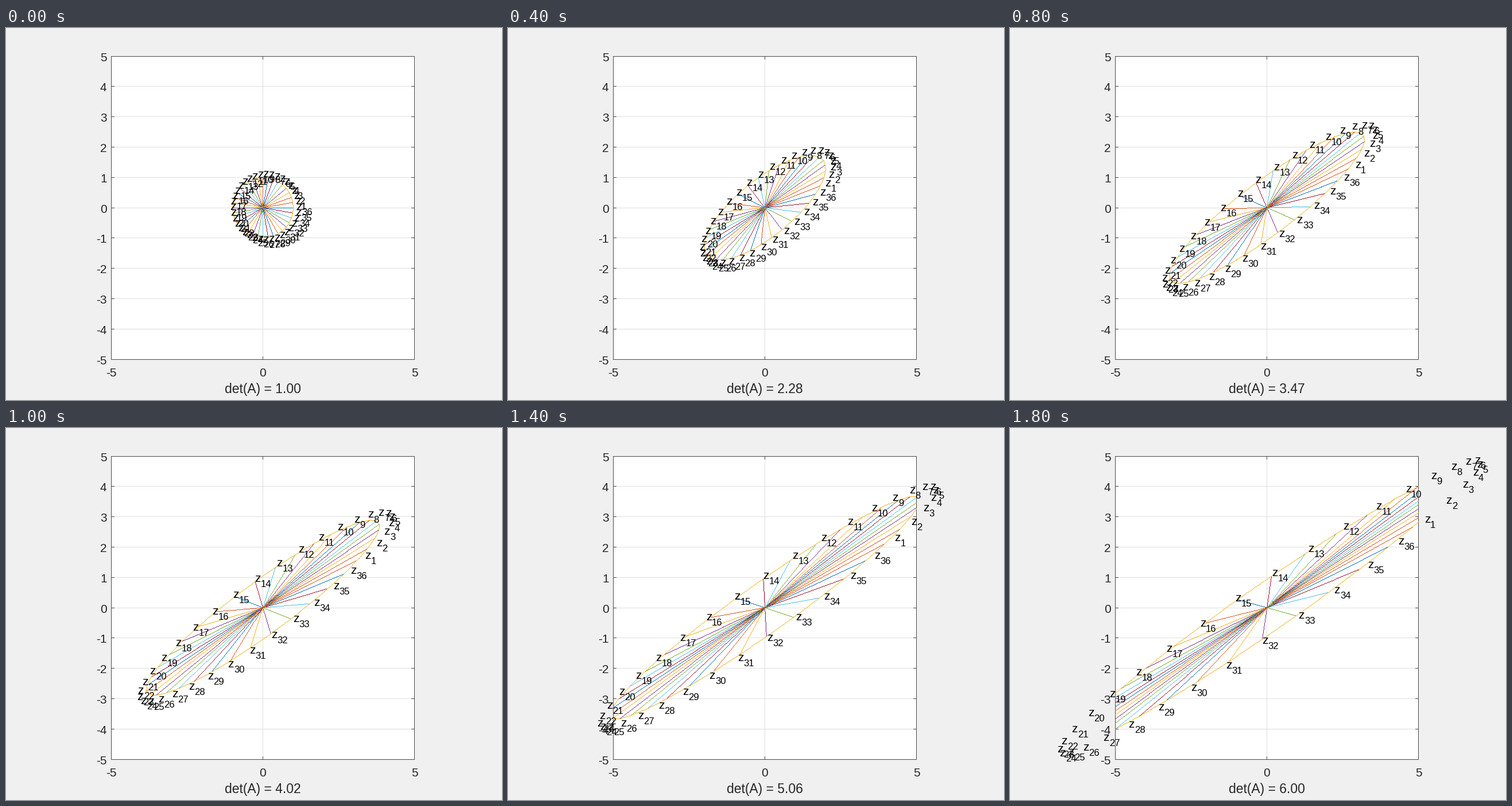
A matplotlib script for the animation above (2 s loop, 864 px wide and 648 px high).

```python
import numpy as np
import matplotlib.pyplot as plt
from matplotlib.animation import FuncAnimation
from matplotlib.colors import to_rgb
from matplotlib.patches import Rectangle

W, H, DPI = 864, 648, 150
CX, CY, UNIT = 447.6, 313.1, 52.81      # plot origin and unit length in pixels
PX = 72 / DPI                           # one pixel in points
STEPS = 10
COUNT = 36
INK, EDGE, GRID = "#262626", "#4a4a4a", "#dfdfdf"
COLORS = ["#0072bd", "#d95319", "#edb120", "#7e2f8e",
          "#77ac30", "#4dbeee", "#a2142f"]

plt.rcParams["font.family"] = "Liberation Sans"

fig = plt.figure(figsize=(W / DPI, H / DPI), dpi=DPI, facecolor="#f0f0f0")
ax = fig.add_axes([0, 0, 1, 1])
ax.axis("off")


def col(x):
    return np.floor(CX + x * UNIT) + 0.5


def row(y):
    return np.floor(CY - y * UNIT) + 0.5


def rule(x0, y0, x1, y1, color, z):
    ax.plot([x0, x1], [y0, y1], color=color, lw=PX, zorder=z,
            snap=False, solid_capstyle="projecting")


def write(x, y, s, size, color=INK, ha="left", z=3):
    return ax.text(x, y, s, fontsize=size, color=color, ha=ha,
                   va="baseline", zorder=z)


left, right, top, bottom = col(-5), col(5), row(5), row(-5)

ax.add_patch(Rectangle((left, top), right - left, bottom - top,
                       fc="white", ec="none", snap=False, zorder=0))

# Grid, ticks and tick labels
TICK = 5
for v in range(-5, 6):
    y = row(v)
    if abs(v) < 5:
        rule(left, y, right, y, GRID, 1)
    rule(left, y, left + TICK, y, EDGE, 2)
    rule(right - TICK, y, right, y, EDGE, 2)
    write(175.5, y + 8.5, str(v), 10, ha="right")
rule(col(0), top, col(0), bottom, GRID, 1)
for v in (-5, 0, 5):
    x = col(v)
    rule(x, bottom - TICK, x, bottom, EDGE, 2)
    rule(x, top, x, top + TICK, EDGE, 2)
    write(x, 607, str(v), 10, ha="center")
for y in (top, bottom):
    rule(left, y, right, y, EDGE, 2)
for x in (left, right):
    rule(x, top, x, bottom, EDGE, 2)

caption = write(CX, 636, "", 11, ha="center")
names = [(write(0, 0, "z", 10, "black", z=6),
          write(0, 0, str(k), 8, "black", z=6)) for k in range(1, COUNT + 1)]

# Thin aliased lines are rasterised onto a transparent layer.
layer = np.zeros((H, W, 4))
plot = ax.imshow(layer, extent=(0, W, H, 0), aspect="auto",
                 interpolation="nearest", zorder=4)
ax.set_xlim(0, W)
ax.set_ylim(H, 0)


def stroke(x0, y0, x1, y1, i):
    n = int(np.ceil(max(abs(x1 - x0), abs(y1 - y0)))) + 1
    x = np.floor(np.linspace(x0, x1, n)).astype(int)
    y = np.floor(np.linspace(y0, y1, n)).astype(int)
    inside = (x > left - 1) & (x < right) & (y > top - 1) & (y < bottom)
    layer[y[inside], x[inside]] = (*to_rgb(COLORS[i % len(COLORS)]), 1)


# The closing vector repeats the first one.
angles = np.radians(10 * np.arange(1, COUNT + 2))
circle = np.array([np.cos(angles), np.sin(angles)])
START = np.eye(2)
END = np.array([[4, 5], [2, 4]])


def draw(n):
    t = n / (STEPS - 1)
    A = (1 - t) * START + t * END
    u, v = UNIT * (A @ circle)
    x, y = CX + u, CY - v

    layer[:] = 0
    for i in range(COUNT + 1):
        stroke(CX, CY, x[i], y[i], i)
    for i in range(COUNT):
        stroke(x[i], y[i], x[i + 1], y[i + 1], COUNT + 1)
    plot.set_data(layer)

    for (letter, index), a, b in zip(names, u, v):
        lx, ly = CX + 1.08 * a, CY - 1.08 * b
        letter.set_position((lx, ly + 4))
        index.set_position((lx + 10.4, ly + 13))
    caption.set_text(f"det(A) = {np.linalg.det(A):.2f}")
    return []


anim = FuncAnimation(fig, draw, frames=STEPS, interval=200,
                     repeat=True, repeat_delay=0, blit=False)
plt.show()
```
